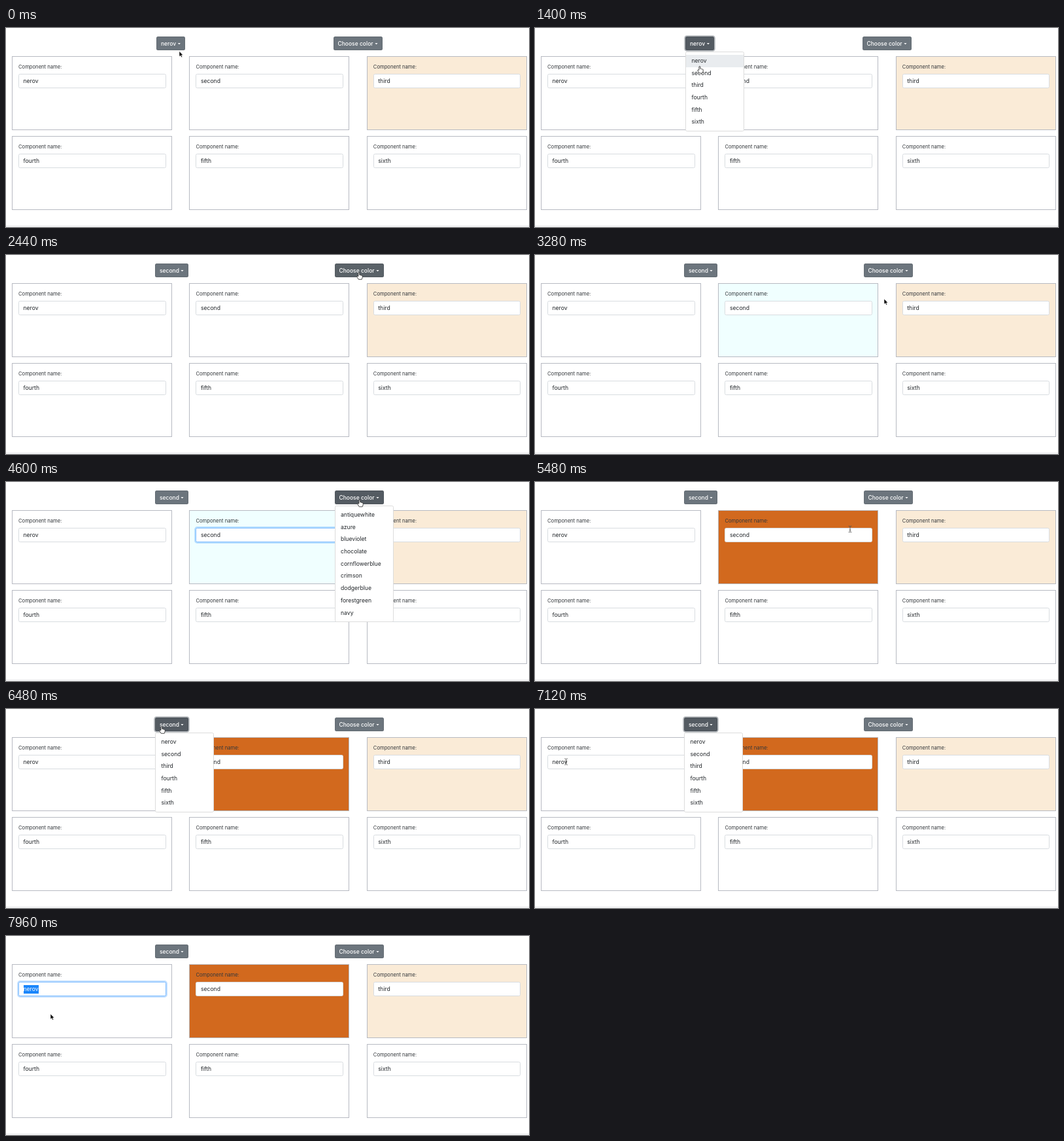
These frames come from a looping animation (800x304 px, 8 s). An HTML page:

```html
<!DOCTYPE html>
<html lang="en">
<head>
<meta charset="utf-8">
<title>Component colors</title>
<style>
  html, body { margin: 0; width: 100%; height: 100%; overflow: hidden; background: #fff; }
  #stage { position: relative; width: 800px; height: 304px; overflow: hidden;
    font: 8.65px Inter, "Open Sans", sans-serif; color: #212529; }
  #stage div { position: absolute; box-sizing: border-box; white-space: pre; }
  .card { width: 245px; height: 113px; border: 1px solid #b7bac2; }
  .label { left: 9px; top: 9px; font-size: 7.65px; line-height: 14px; color: #34383c; }
  .input { left: 9px; top: 25.5px; width: 225.5px; height: 22.5px; padding-left: 6.5px;
    line-height: 21px; background: #fff; border: 1px solid #d8dce0; border-radius: 2.5px; }
  .input span { display: inline-block; line-height: 13px; }
  .button { top: 13px; height: 21.4px; padding-left: 7px; line-height: 22px;
    border-radius: 2.5px; color: #fff; font-size: 8.5px; font-weight: 550; }
  .button::after { content: ""; position: absolute; right: 7px; top: 9.5px; width: 5px; height: 2.8px;
    background: #fff; clip-path: polygon(0 0, 100% 0, 50% 100%); }
  .menu { top: 36px; width: 90px; padding: 4px 0; background: #fff;
    border: 1px solid #dcdcdc; border-radius: 2.5px; }
  #stage .item { position: static; height: 18.7px; line-height: 18.7px; padding-left: 8.5px; }
  .rule { left: 0; top: 302px; width: 800px; height: 1px; background: #e4e5e7; }
  svg { position: absolute; left: 0; top: 0; overflow: visible; }
</style>
</head>
<body>
<div id="stage"></div>
<script>
const LOOP = 8000;
const NAMES = ["nerov", "second", "third", "fourth", "fifth", "sixth"];
const COLORS = ["antiquewhite", "azure", "blueviolet", "chocolate", "cornflowerblue",
  "crimson", "dodgerblue", "forestgreen", "navy"];
const MENU_TOP = 41, ROW = 18.7, FADE = 150;

// Clicks, in ms
const PICK_NAME = 1600, PICK_AZURE = 3120, FOCUS_SECOND = 3850, PICK_CHOCOLATE = 5100,
  FOCUS_FIRST = 7250, SELECT_TEXT = 7400;
const NAME_OPEN = [[700, PICK_NAME], [6320, FOCUS_FIRST]];
const COLOR_OPEN = [[2480, PICK_AZURE], [4590, PICK_CHOCOLATE]];

// Pointer stops: time, x, y
const PATH = [
  [0, 265, 35.5], [450, 257, 27], [1050, 256, 28], [1400, 252, 58.7], [1560, 250, 68],
  [1700, 250, 68], [2350, 540, 27], [2600, 540, 27], [3020, 533, 67], [3280, 534, 67],
  [3760, 470, 81], [3980, 470, 81], [4480, 541, 27.5], [4650, 541, 27.5], [5000, 530, 105],
  [5150, 530, 105], [5480, 482, 72], [6200, 238, 27], [6600, 238, 27], [7150, 46, 81],
  [7520, 46, 81], [7900, 68, 119], [8000, 68, 119]
];

const stage = document.getElementById("stage");

function add(parent, className, text = "") {
  const node = document.createElement("div");
  node.className = className;
  node.textContent = text;
  return parent.appendChild(node);
}

const cards = NAMES.map((name, i) => {
  const card = add(stage, "card");
  card.style.left = 9 + (i % 3) * 271.4 + "px";
  card.style.top = (i < 3 ? 43 : 165) + "px";
  add(card, "label", "Component name:");
  const input = add(card, "input");
  const text = input.appendChild(document.createElement("span"));
  text.textContent = name;
  return { card, input, text };
});
cards[2].card.style.background = "antiquewhite";
add(stage, "rule");

function makeDropdown(options, openTimes) {
  const button = add(stage, "button");
  const menu = add(stage, "menu");
  const items = options.map(option => add(menu, "item", option));
  return { button, menu, items, openTimes };
}
const nameDrop = makeDropdown(NAMES, NAME_OPEN);
const colorDrop = makeDropdown(COLORS, COLOR_OPEN);

stage.insertAdjacentHTML("beforeend", `<svg width="1" height="1">
  <path id="arrow" d="M0 0V8.2L1.9 6.5 3.2 9.3 4.6 8.7 3.4 6H5.8Z" fill="#000" stroke="#fff" stroke-width=".6"/>
  <path id="hand" d="M-1.1 5.6V.3Q-.2-.9.8.3V3.5Q1.7 2.9 2.3 3.9 3.3 3.4 3.8 4.3 5 4 5.2 5.2V7.3L4.2 10.3H-.7L-3.2 6.4Q-3.2 5-2.1 5.2Z" fill="#fff" stroke="#222" stroke-width=".8"/>
  <path id="beam" d="M-2.3-4.7Q-.3-4.7 0-3.8 .3-4.7 2.3-4.7M0-3.8V3.8M-2.3 4.7Q-.3 4.7 0 3.8 .3 4.7 2.3 4.7M-1.2 1.4H1.2" fill="none" stroke="#555" stroke-width=".9"/>
</svg>`);
const cursors = ["arrow", "hand", "beam"].map(id => document.getElementById(id));

const clamp = v => Math.max(0, Math.min(1, v));
const within = (t, spans) => spans.some(([a, b]) => t >= a && t < b);
const fade = (t, spans) =>
  Math.max(...spans.map(([a, b]) => Math.min(clamp((t - a) / FADE), 1 - clamp((t - b) / FADE))));

function pointerAt(t) {
  const i = PATH.findIndex(stop => stop[0] > t);
  const [t0, x0, y0] = PATH[i - 1], [t1, x1, y1] = PATH[i];
  const p = (t - t0) / (t1 - t0), e = p * p * (3 - 2 * p);
  return [x0 + (x1 - x0) * e, y0 + (y1 - y0) * e];
}

// Draws a dropdown and reports whether the pointer is on a clickable part of it
function drawDropdown(drop, t, [px, py], label, left, width) {
  const open = within(t, drop.openTimes);
  const overButton = px >= left && px < left + width && py >= 13 && py < 34;
  const row = open && px >= left && px < left + 90 ? Math.floor((py - MENU_TOP) / ROW) : -1;
  const { button, menu, items } = drop;
  button.textContent = label;
  button.style.left = left + "px";
  button.style.width = width + "px";
  button.style.background = open ? "#545b62" : overButton ? "#5a6268" : "#6c757d";
  button.style.boxShadow = `inset 0 0 0 1px rgba(0,0,0,.08),
    0 0 0 1.8px rgba(108,117,125,${0.5 * fade(t, drop.openTimes)})`;
  menu.style.left = left + "px";
  menu.style.display = open ? "block" : "none";
  items.forEach((item, i) => item.style.background = i === row ? "#e9ecef" : "");
  return overButton || (row >= 0 && row < items.length);
}

function drawFocus(input, amount) {
  input.style.borderColor = amount > 0.5 ? "#80bdff" : "";
  input.style.boxShadow = `0 0 0 1.9px rgba(0,123,255,${0.25 * amount})`;
}

function overInput([x, y]) {
  const column = (x - 18.5) % 271.4;
  return column >= 0 && column < 226 && ((y >= 70 && y < 92) || (y >= 192 && y < 214));
}

function draw(t) {
  const pointer = pointerAt(t);
  const picked = t >= PICK_NAME;
  const overName = drawDropdown(nameDrop, t, pointer, picked ? "second" : NAMES[0],
    picked ? 228 : 230, picked ? 51 : 44.4);
  const overColor = drawDropdown(colorDrop, t, pointer, "Choose color", picked ? 502.5 : 500.5, 75.5);

  cards[1].card.style.background =
    t >= PICK_CHOCOLATE ? "chocolate" : t >= PICK_AZURE ? "azure" : "#fff";
  drawFocus(cards[1].input, fade(t, [[FOCUS_SECOND, 4600]]));
  drawFocus(cards[0].input, fade(t, [[FOCUS_FIRST, LOOP]]));

  const selected = t >= SELECT_TEXT;
  cards[0].text.style.background = selected ? "#1a86fb" : "";
  cards[0].text.style.color = selected ? "#fff" : "";

  const kind = overName || overColor ? 1 : overInput(pointer) ? 2 : 0;
  cursors.forEach((cursor, i) => {
    cursor.style.display = i === kind ? "" : "none";
    cursor.setAttribute("transform", `translate(${pointer})`);
  });
}

const start = performance.now();
function tick() {
  draw((performance.now() - start) % LOOP);
  requestAnimationFrame(tick);
}
tick();
</script>
</body>
</html>
```
